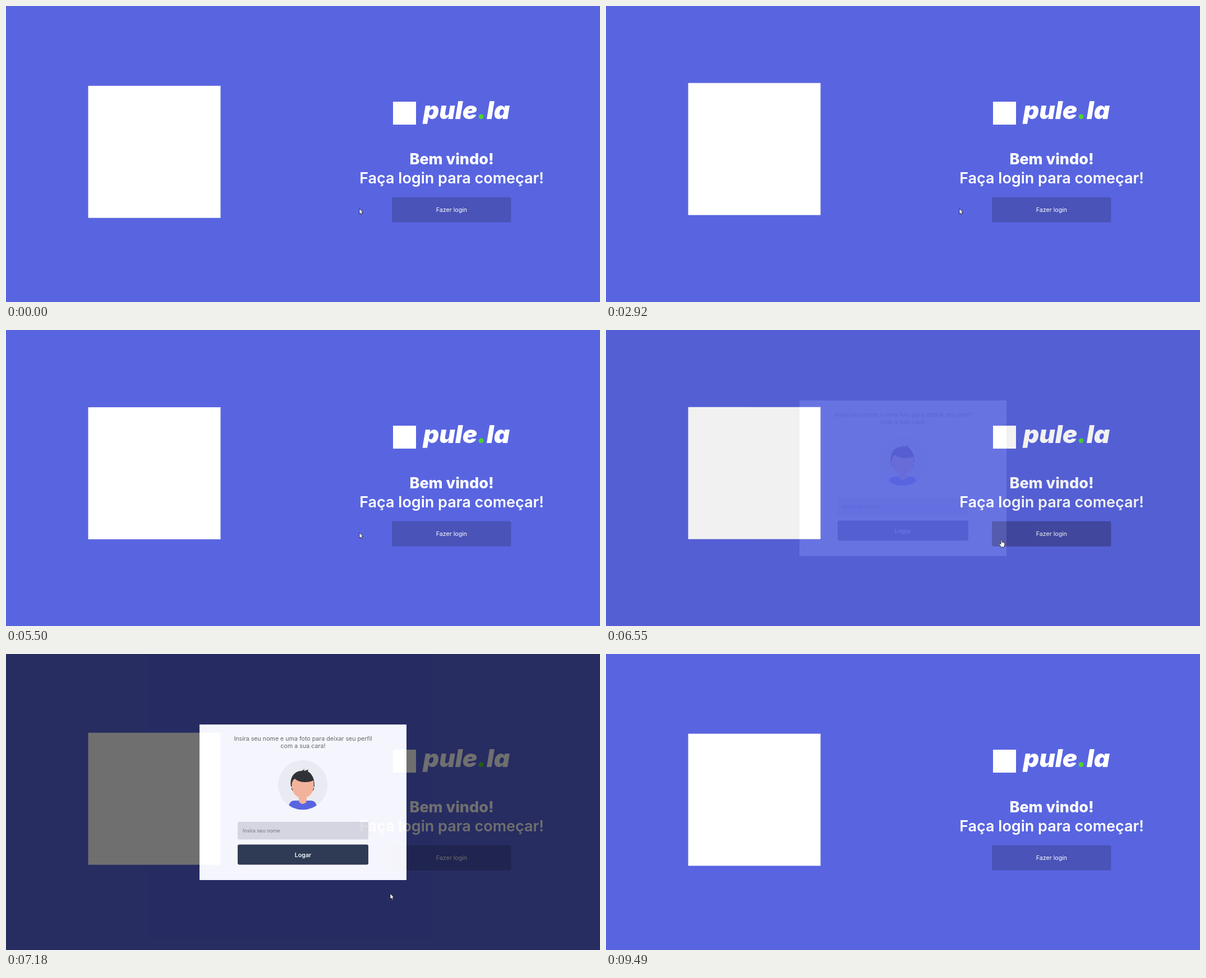
An HTML page for the animation above (9560 ms loop, 1059 by 529 pixels).

```html
<!DOCTYPE html>
<html lang="pt">
<head>
<meta charset="utf-8">
<title>Login</title>
<style>
  html, body { margin: 0; width: 100%; height: 100%; overflow: hidden; background: #5965e0; }
  svg { display: block; width: 1059px; height: 529px; }
  text { font-family: Inter, Roboto, sans-serif; text-anchor: middle; fill: #fff; }
  .brand { font-size: 44px; font-weight: 900; font-style: italic; }
  .title { font-size: 27px; font-weight: 600; }
  .small { font-size: 10.67px; }
  .note { fill: #666; }
  .hint { font-size: 8.89px; text-anchor: start; fill: #757575; }
</style>
</head>
<body>
<svg viewBox="0 0 1059 529">
  <rect width="1059" height="529" fill="#5965e0"/>
  <rect id="mark" x="146.5" width="236" height="236" fill="#fff"/>

  <rect x="690" y="171" width="41" height="41" fill="#fff"/>
  <text class="brand" x="821" y="202">pule<tspan fill="#4cd62b">.</tspan>la</text>
  <text class="title" x="794.5" y="283.3" style="font-weight:800">Bem vindo!</text>
  <text class="title" x="794.5" y="316.5">Faça login para começar!</text>
  <rect id="enter" x="688" y="341.7" width="212.5" height="45" rx="3" fill="#4953b8"/>
  <text class="small" x="794.5" y="368.2">Fazer login</text>

  <g id="modal">
    <path d="M0 0H1059V529H0ZM345 126V404H714V126Z" fill="#000" fill-opacity=".6"/>
    <rect x="345" y="126" width="369" height="278" fill="#fff"/>
    <text class="small note" x="529.5" y="154.8">Insira seu nome e uma foto para deixar seu perfil</text>
    <text class="small note" x="529.5" y="168.2">com a sua cara!</text>

    <clipPath id="disc"><circle cx="529" cy="234" r="44.3"/></clipPath>
    <g clip-path="url(#disc)">
      <circle cx="529" cy="234" r="44.3" fill="#f4f4f4"/>
      <path d="M504 280V272Q506 262 514 262H544Q552 262 554 272V280Z" fill="#5965e0"/>
      <path d="M522 250H536V261A7 7 0 0 1 522 261Z" fill="#fdb797"/>
      <path d="M508 237C505 220 515 209 526 209Q530 208 532 205L531 209Q536 208 539 206Q537 210 540 211Q550 218 550 237Z" fill="#2f2e2e"/>
      <path d="M509.5 236Q509 226 515 223Q522 229 533 229Q542 229 548 226Q549 231 548.5 237A19.5 20.5 0 0 1 509.5 237Z" fill="#fdb797"/>
      <path d="M509 239l1.6 5M549 239l-1.6 5" stroke="#2f2e2e" fill="none"/>
    </g>

    <rect x="413" y="300" width="233" height="31.5" rx="3" fill="#dcdde1"/>
    <text class="hint" x="422" y="319">Insira seu nome</text>
    <rect x="413" y="340.5" width="233" height="36" rx="3" fill="#2d394d"/>
    <text class="small" x="529.5" y="362.6" style="font-weight:600">Logar</text>
  </g>

  <g id="cursor" stroke="#111" stroke-width=".8" stroke-linejoin="round" fill="#fff">
    <path id="arrow" d="M0 0V10L2.2 8L3.8 11.4L5.4 10.6L3.9 7.4H6.8Z"/>
    <path id="hand" d="M-1 .8Q0-.8 1 .8V5L5 6Q6.5 6.5 6 9L5 14H-.5L-4 9Q-4.5 7-2.5 7.5L-1 9Z"/>
  </g>
</svg>
<script>
  const LOOP = 9560, BOB = 1040;
  const $ = id => document.getElementById(id);
  const clamp = v => Math.min(1, Math.max(0, v));
  const mix = (a, b, p) => a + (b - a) * p;

  // time, x, y of the pointer tip
  const path = [
    [0, 630, 362], [5500, 630, 362], [5880, 667, 379], [6200, 705, 374],
    [6850, 705, 374], [7180, 685, 428], [7500, 608, 460],
    [7880, 553, 451], [8300, 535, 448], [LOOP, 535, 448]
  ];

  // the CSS "ease" curve, solved by bisection
  function ease(x) {
    x = clamp(x);
    let lo = 0, hi = 1;
    for (let i = 0; i < 20; i++) {
      const s = (lo + hi) / 2, r = 1 - s;
      if (3 * r * r * s * .25 + 3 * r * s * s * .25 + s ** 3 < x) lo = s; else hi = s;
    }
    const r = 1 - lo;
    return 3 * r * r * lo * .1 + 3 * r * lo * lo + lo ** 3;
  }

  function pointer(t) {
    const i = path.findIndex(k => k[0] > t);
    const [a, b] = [path[i - 1], path[i]];
    const p = (t - a[0]) / (b[0] - a[0]);
    const q = p * p * (3 - 2 * p);
    return [mix(a[1], b[1], q), mix(a[2], b[2], q)];
  }

  function draw(t) {
    const bob = Math.cos(2 * Math.PI * t / BOB - .35);
    $('mark').setAttribute('y', 137.5 + 5.5 * bob);

    const shown = ease((t - 6450) / 1040) - ease((t - 8880) / 620);
    $('modal').setAttribute('opacity', clamp(shown));

    const [x, y] = pointer(t);
    const over = x >= 688 && y >= 342 && y <= 387;
    $('cursor').setAttribute('transform', `translate(${x} ${y})`);
    $('cursor').style.display = t < 9480 ? '' : 'none';
    $('arrow').style.display = over ? 'none' : '';
    $('hand').style.display = over ? '' : 'none';
    $('enter').setAttribute('fill', over ? '#444ba6' : '#4953b8');
  }

  const start = performance.now();
  function tick() {
    draw((performance.now() - start) % LOOP);
    requestAnimationFrame(tick);
  }
  tick();
</script>
</body>
</html>
```
